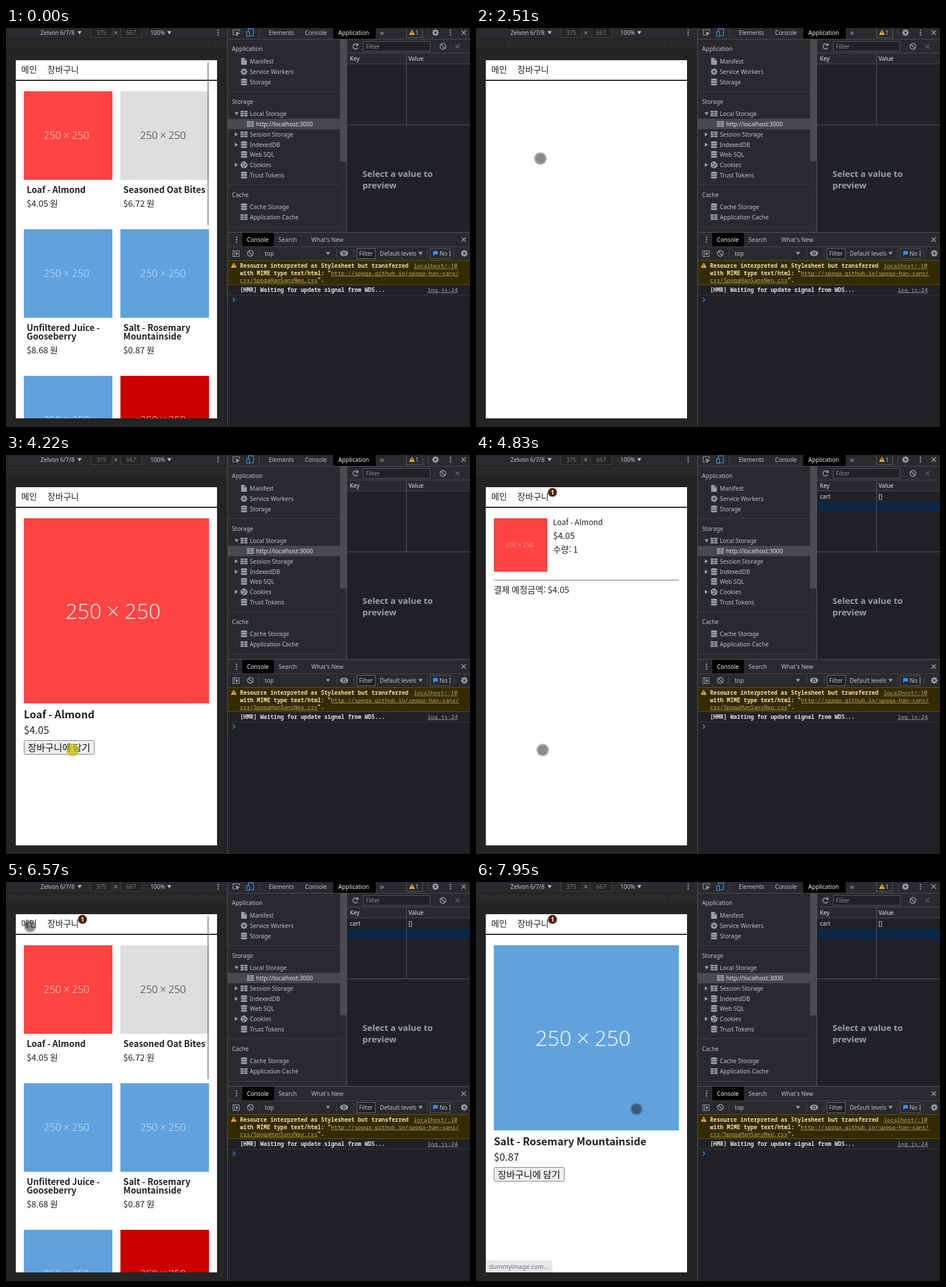
These frames come from a looping animation (807 px wide and 694 px high, 8000 ms). An HTML page with a canvas:

```html
<!DOCTYPE html>
<html lang="ko">
<head>
<meta charset="utf-8">
<title>Shop demo</title>
<style>
html, body { margin: 0; width: 100%; height: 100%; overflow: hidden; background: #242424; }
canvas { display: block; width: 807px; height: 694px; }
</style>
</head>
<body>
<canvas id="stage"></canvas>
<script>
const W = 807, H = 694, LOOP = 8000;
const canvas = document.getElementById('stage');
const c = canvas.getContext('2d');
const dpr = window.devicePixelRatio || 1;
canvas.width = W * dpr;
canvas.height = H * dpr;

const UI = '"Noto Sans", "Open Sans", sans-serif';
const KR = '"Noto Sans CJK KR", "Noto Sans CJK", "Noto Sans KR", sans-serif';
const MONO = '"Noto Sans Mono", "DejaVu Sans Mono", monospace';
const THIN = '"Open Sans", "Noto Sans", sans-serif';
const RED = '#ff4444', BLUE = '#5fa2dd', INK = '#212121';

const PRODUCTS = [
  { x: 31, y: 110, color: RED, ink: '#f6c4b2', name: ['Loaf - Almond'], price: '$4.05' },
  { x: 199, y: 110, color: '#dddedd', ink: '#444', name: ['Seasoned Oat Bites'], price: '$6.72' },
  { x: 31, y: 350, color: BLUE, ink: '#c3def5', name: ['Unfiltered Juice -', 'Gooseberry'], price: '$8.68' },
  { x: 199, y: 350, color: BLUE, ink: '#c3def5', name: ['Salt - Rosemary', 'Mountainside'], price: '$0.87' },
  { x: 31, y: 605, color: BLUE, ink: '#c3def5' },
  { x: 199, y: 605, color: '#cc0000', ink: '#f0adad' }
];

function rect(x, y, w, h, color) {
  c.fillStyle = color;
  c.fillRect(x, y, w, h);
}
function frame(x, y, w, h, color, fill) {
  if (fill) rect(x, y, w, h, fill);
  c.strokeStyle = color;
  c.lineWidth = 1;
  c.strokeRect(x + .5, y + .5, w - 1, h - 1);
}
function text(s, x, y, size, color, family = UI, weight = 400) {
  c.font = `${weight} ${size}px ${family}`;
  c.fillStyle = color;
  c.fillText(s, x, y);
}
const label = (s, x, mid, color = '#bdc1c6') => text(s, x, mid + 3.7, 10.15, color);
function disc(x, y, r, color) {
  c.fillStyle = color;
  c.beginPath();
  c.arc(x, y, r, 0, 7);
  c.fill();
}
function ring(x, y, r, color, w = 1.4) {
  c.strokeStyle = color;
  c.lineWidth = w;
  c.beginPath();
  c.arc(x, y, r, 0, 2 * Math.PI);
  c.stroke();
}
function path(points, color, fill, w = 1.4) {
  c.beginPath();
  points.forEach(([x, y]) => c.lineTo(x, y));
  if (fill) { c.fillStyle = color; c.fill(); return; }
  c.strokeStyle = color;
  c.lineWidth = w;
  c.stroke();
}

// Toolbar glyphs
const GREY = '#9aa0a6';
const down = (x, y, color = GREY) => path([[x - 3.5, y - 2.5], [x + 3.5, y - 2.5], [x, y + 3]], color, true);
const right = (x, y) => path([[x - 2, y - 3.5], [x + 3.5, y], [x - 2, y + 3.5]], GREY, true);
const dots = (x, y) => [-4, 0, 4].forEach(d => disc(x, y + d, 1.3, GREY));
function cross(x, y, color = GREY, r = 3.7) {
  path([[x - r, y - r], [x + r, y + r]], color);
  path([[x + r, y - r], [x - r, y + r]], color);
}
function gear(x, y) {
  for (let i = 0; i < 4; i++) {
    const a = i * Math.PI / 4, dx = Math.cos(a) * 5.8, dy = Math.sin(a) * 5.8;
    path([[x - dx, y - dy], [x + dx, y + dy]], GREY, false, 2.4);
  }
  ring(x, y, 3.3, GREY, 2.6);
  disc(x, y, 1.9, '#292a2d');
}
function ban(x, y) {
  ring(x, y, 5, GREY);
  path([[x - 3.5, y - 3.5], [x + 3.5, y + 3.5]], GREY);
}
function grid(x, y) {
  [0, 1].forEach(i => [0, 1, 2].forEach(j => rect(x - 6 + i * 6.5, y - 5 + j * 3.6, 5.5, 2.7, GREY)));
}
function stack(x, y) {
  c.fillStyle = GREY;
  for (let i = 0; i < 3; i++) {
    c.beginPath();
    c.roundRect(x - 5.5, y - 6 + i * 4.2, 11, 3.4, [i ? 1 : 4, i ? 1 : 4, i ? 3 : 1, i ? 3 : 1]);
    c.fill();
  }
}
function sheet(x, y) {
  path([[x - 5, y - 6], [x + 1, y - 6], [x + 5, y - 2], [x + 5, y + 6], [x - 5, y + 6]], GREY, true);
  path([[x + 1, y - 5], [x + 1, y - 2], [x + 4, y - 2]], '#292a2d', false, 1);
}
function cookie(x, y) {
  disc(x, y, 6, GREY);
  [[-2, -2], [2, 0], [-1, 3], [4, -4]].forEach(([a, b]) => disc(x + a, y + b, 1.3, '#292a2d'));
}
function warn(x, y) {
  path([[x, y - 5], [x + 5, y + 4], [x - 5, y + 4]], '#f5b13d', true);
  rect(x - .6, y - 2, 1.2, 3, '#332b00');
  rect(x - .6, y + 2, 1.2, 1.2, '#332b00');
}

function drawDeviceBar() {
  rect(0, 0, 386, H, '#242424');
  rect(0, 0, 386, 18, '#292a2d');
  rect(0, 18, 386, 1, '#202020');
  rect(0, 20, 386, 17, '#292929');
  [26, 50, 333, 357].forEach(x => rect(x, 20, 1, 17, '#202020'));
  rect(0, 37, 386, 1, '#202020');
  label('Zelvon 6/7/8', 60, 8, '#c4c7ca');
  down(128, 8, '#c4c7ca');
  frame(147, -1, 38, 18, '#424346', '#242424');
  frame(199, -1, 38, 18, '#424346', '#242424');
  label('375', 157, 8, '#77797c');
  label('667', 209, 8, '#77797c');
  label('×', 188, 8);
  label('100%', 251, 8, '#c4c7ca');
  down(284, 8, '#c4c7ca');
  dots(369, 8);
}

function drawTabs() {
  rect(386, 0, 421, 19, '#292a2d');
  path([[403, 12], [395, 12], [395, 3], [406, 3], [406, 6]], GREY, false, 1.2);
  path([[399, 6], [407, 9], [404, 10.5], [402.5, 14]], GREY, true);
  frame(421, 1, 10, 13, '#4a9df0');
  frame(418, 6, 6, 9, '#4a9df0', '#292a2d');
  rect(440, 1, 1, 14, '#494c50');
  label('Elements', 457, 8);
  label('Console', 520, 8);
  rect(569, 0, 74, 19, '#000');
  label('Application', 578, 8, '#f0f1f2');
  text('»', 650, 13, 15, GREY);
  frame(696, -1, 29, 18, '#5a5d61');
  warn(706, 8);
  label('1', 712, 8);
  rect(734, 1, 1, 14, '#494c50');
  gear(747, 8);
  dots(773, 8);
  cross(796, 8);
  rect(386, 19, 421, 1, '#494c50');
}

function drawSidebar() {
  rect(386, 20, 195, 335, '#292a2d');
  [110, 272, 346].forEach(y => rect(386, y, 195, 1, '#3d3f43'));
  rect(386, 158, 195, 18, '#48494c');
  [['Application', 36], ['Storage', 128], ['Cache', 290]].forEach(([s, y]) => label(s, 393, y));
  const rows = [
    [sheet, 'Manifest', 58], [gear, 'Service Workers', 76], [stack, 'Storage', 94],
    [grid, 'Local Storage', 149], [grid, 'Session Storage', 185], [stack, 'IndexedDB', 203],
    [stack, 'Web SQL', 220], [cookie, 'Cookies', 238], [stack, 'Trust Tokens', 256],
    [stack, 'Cache Storage', 311], [grid, 'Application Cache', 329]
  ];
  rows.forEach(([icon, s, y]) => { icon(414, y); label(s, 424, y); });
  grid(425, 167);
  label('http://localhost:3000', 435, 167, '#e8eaed');
  down(401, 149);
  [185, 203, 238].forEach(y => right(400, y));
  rect(581, 20, 11, 335, '#2b2c2f');
  rect(581, 20, 11, 212, '#4b4c4e');
  rect(592, 20, 1, 335, '#56595d');
}

function drawStorage(saved) {
  rect(593, 20, 214, 335, '#202124');
  rect(593, 20, 214, 24, '#292a2d');
  c.strokeStyle = GREY;
  c.lineWidth = 1.5;
  c.beginPath();
  c.arc(608, 32, 4.5, .5, 5.4);
  c.stroke();
  path([[613, 26], [613, 31], [608, 31]], GREY, true);
  frame(621, 23, 117, 18, '#55585c', '#202124');
  label('Filter', 626, 32, '#8d9196');
  ban(760, 32);
  cross(785, 32, '#5f6266');
  rect(593, 44, 214, 18, '#292a2d');
  rect(593, 43, 214, 1, '#494c50');
  rect(593, 62, 214, 1, '#494c50');
  label('Key', 598, 53, '#e0e2e5');
  label('Value', 700, 53, '#e0e2e5');
  if (saved) {
    rect(594, 82, 213, 17, '#0b2645');
    label('cart', 598, 72, '#e0e2e5');
    label('[]', 700, 72, '#e0e2e5');
  }
  rect(696, 44, 1, 124, '#56595d');
  rect(593, 168, 214, 1, '#56595d');
  text('Select a value to', 620, 259, 15, GREY, UI, 700);
  text('preview', 620, 279, 15, GREY, UI, 700);
}

function link(s, x, y, color) {
  text(s, x, y, 9.77, color, MONO);
  rect(x, y + 1.5, c.measureText(s).width, .8, color);
}

function drawConsole() {
  rect(386, 355, 421, 339, '#202124');
  rect(386, 355, 421, 49, '#292a2d');
  rect(386, 355, 421, 1, '#56595d');
  rect(386, 380, 421, 1, '#43464a');
  dots(401, 368);
  rect(411, 356, 55, 24, '#000');
  label('Console', 419, 368, '#f0f1f2');
  label('Search', 474, 368);
  label("What's New", 531, 368);
  cross(796, 368);
  frame(394, 387, 12, 11, GREY);
  rect(397, 387, 1, 11, GREY);
  path([[400, 389], [404, 392.5], [400, 396]], GREY, true);
  ban(425, 392);
  [439, 575, 605, 732, 779].forEach(x => rect(x, 385, 1, 14, '#43464a'));
  label('top', 450, 392);
  down(560, 392);
  c.fillStyle = GREY;
  c.beginPath();
  c.ellipse(588, 392, 7, 4.8, 0, 0, 7);
  c.fill();
  disc(588, 392, 3, '#292a2d');
  disc(588, 392, 1.7, GREY);
  frame(610, 383, 33, 19, '#6a6d71', '#202124');
  label('Filter', 614, 392);
  label('Default levels', 650, 392);
  down(721, 392);
  frame(737, 383, 36, 19, '#55585c');
  rect(743, 388, 8, 6, '#3b8cf0');
  path([[743, 393], [746, 393], [743, 396.5]], '#3b8cf0', true);
  label('No I', 754, 392);
  gear(797, 392);
  rect(386, 404, 421, 43, '#665500');
  rect(386, 405, 421, 41, '#332b00');
  warn(396, 413);
  const say = (s, y, color) => text(s, 407, y, 9.77, color, MONO, 600);
  const pale = '#f3dfa0', dim = '#c3ad72';
  say('Resource interpreted as Stylesheet but transferred', 417, pale);
  say('with MIME type text/html: "', 429.5, pale);
  const end = 407 + c.measureText('with MIME type text/html: "').width;
  link('http://spoqa.github.io/spoqa-han-sans/', end, 429.5, dim);
  link('css/SpoqaHanSansNeo.css', 407, 441.5, dim);
  text('".', 407 + c.measureText('css/SpoqaHanSansNeo.css').width, 441.5, 9.77, pale, MONO, 600);
  link('localhost/:10', 709, 417, dim);
  say('[HMR] Waiting for update signal from WDS...', 458.5, '#dfe1e4');
  link('log.js:24', 733, 458.5, '#a9adb2');
  rect(386, 464, 421, 1, '#35373a');
  path([[394.5, 469], [398, 472.5], [394.5, 476]], '#3b8cf0', false, 1.5);
}

function picture(x, y, size, color, ink) {
  rect(x, y, size, size, color);
  c.textAlign = 'center';
  text('250 × 250', x + size * .482, y + size * .542, size * .114, ink, THIN, 300);
  // a hairline outline brings the light face up to its drawn weight
  c.strokeStyle = ink;
  c.lineWidth = size * .0015;
  c.strokeText('250 × 250', x + size * .482, y + size * .542);
  c.textAlign = 'left';
}

function drawList(images) {
  PRODUCTS.forEach(p => {
    if (images) picture(p.x, p.y, 154, p.color, p.ink);
    if (!p.name) return;
    p.name.forEach((s, i) => text(s, p.x + 5, p.y + 177 + i * 15, 15.1, INK, KR, 700));
    text(p.price + ' 원', p.x + 5, p.y + 186 + p.name.length * 15, 14.9, INK, KR);
  });
  rect(350, 60, 3, 283, 'rgba(125,125,125,.6)');
}

function drawDetail(p, image) {
  if (image) picture(31, 110, 322, p.color, p.color === RED ? '#ffd0d0' : '#deedf9');
  text(p.name.join(' '), 31, 458, 18.1, INK, KR, 700);
  text(p.price, 31, 484.5, 17.6, INK, KR, 500);
  c.fillStyle = '#efefef';
  c.strokeStyle = '#767676';
  c.lineWidth = 1;
  c.beginPath();
  c.roundRect(31.5, 496.5, 122, 24, 2);
  c.fill();
  c.stroke();
  text('장바구니에 담기', 38, 514.5, 16.3, '#111', KR, 300);
}

function drawCart(image) {
  const p = PRODUCTS[0];
  if (image) picture(31, 110, 93, p.color, '#ffa3a0');
  text(p.name[0], 134, 121.5, 13.4, INK, KR, 500);
  text(p.price, 134, 146, 15.2, INK, KR, 500);
  text('수량: 1', 134, 170, 14.9, INK, KR, 500);
  rect(31, 217, 322, 1, '#8c8c8c');
  rect(31, 218, 322, 1, '#d8d8d8');
  text('결제 예정금액: $4.05', 31, 240, 15, INK, KR, 500);
}

function drawStatus(alpha) {
  c.save();
  c.fillStyle = '#e6e7ea';
  c.beginPath();
  c.roundRect(17, 658, 116, 21, [0, 4, 0, 0]);
  c.fill();
  c.globalAlpha = alpha;
  text('dummyimage.com...', 23, 672.5, 10.7, '#6c6f73');
  c.restore();
}

function drawPage(t) {
  c.save();
  c.beginPath();
  c.rect(17, 56, 350, 623);
  c.clip();
  rect(17, 56, 350, 623, '#fff');
  text('메인', 26.5, 78, 14.9, INK, KR, 500);
  text('장바구니', 72, 78, 14.9, INK, KR, 500);
  rect(17, 90, 350, 2, '#222');
  if (t >= 4480) {
    disc(133, 65, 7.8, '#55200f');
    text('1', 130, 69, 10.5, '#fff', UI, 700);
  }
  if (t < 2510) drawList(true);
  else if (t >= 2780 && t < 4400) drawDetail(PRODUCTS[0], true);
  else if (t >= 4560 && t < 6310) drawCart(t >= 4700);
  else if (t >= 6310 && t < 7710) drawList(t >= 6470);
  else if (t >= 7860) drawDetail(PRODUCTS[3], t >= 7950);
  if (t >= 4400 && t < 4830) drawStatus(1);
  if (t >= 7710) drawStatus(t < 7860 ? .5 : 1);
  c.restore();
}

// start, end, steps, from, to, sideways bow
const MOVES = [
  [740, 1100, 6, [718, 690], [265, 462], 0],
  [1500, 1650, 3, [265, 462], [112, 227], 0],
  [3310, 3910, 9, [112, 227], [115, 516], -9],
  [4160, 4160, 1, [115, 516], [116, 513], 0],
  [5230, 5780, 8, [116, 513], [43, 80], 0],
  [6090, 6090, 1, [43, 80], [42, 77], 0],
  [6620, 7170, 8, [42, 77], [283, 365], 0],
  [7230, 7230, 1, [283, 365], [279.5, 394.5], 0],
  [7480, 7480, 1, [279.5, 394.5], [279, 395], 0]
];
const PRESSES = [[2430, 2510], [4220, 4310], [6210, 6310], [7640, 7710]];

function pointer(t) {
  const m = MOVES.filter(m => t >= m[0]).pop();
  if (!m) return null;
  const [start, end, n, a, b, bow] = m;
  const i = t >= end ? n - 1 : Math.floor((t - start) / (end - start) * (n - 1));
  const u = m === MOVES[0] ? i / (n - 1) : (i + 1) / n;
  const p = u * u * (3 - 2 * u);
  return [a[0] + (b[0] - a[0]) * p + bow * Math.sin(Math.PI * p), a[1] + (b[1] - a[1]) * p];
}

function drawPointer(t) {
  const at = pointer(t);
  if (!at) return;
  const [x, y] = at;
  if (PRESSES.some(([a, b]) => t >= a && t < b)) {
    disc(x, y, 11, 'rgba(192,184,10,.72)');
  } else if (x > 367 || y > 679) {
    const arrow = [[0, 0], [0, 15], [3.5, 12], [6, 17], [8, 16], [6, 11], [10.5, 11], [0, 0]]
      .map(([a, b]) => [x + a, y + b]);
    path(arrow, '#fff', true);
    path(arrow, '#000', false, 1);
  } else {
    disc(x, y, 8.8, 'rgba(20,22,32,.5)');
    ring(x, y, 9.8, 'rgba(95,95,95,.5)', 2);
  }
}

function draw(now) {
  const t = now % LOOP;
  c.setTransform(dpr, 0, 0, dpr, 0, 0);
  drawDeviceBar();
  drawTabs();
  drawSidebar();
  drawStorage(t >= 4480);
  drawConsole();
  rect(385, 0, 1, H, '#56595d');
  drawPage(t);
  drawPointer(t);
}

let begin = null;
function tick(now) {
  if (begin === null) begin = now;
  draw(Math.max(0, now - begin));
  requestAnimationFrame(tick);
}
draw(0);
requestAnimationFrame(tick);
</script>
</body>
</html>
```
